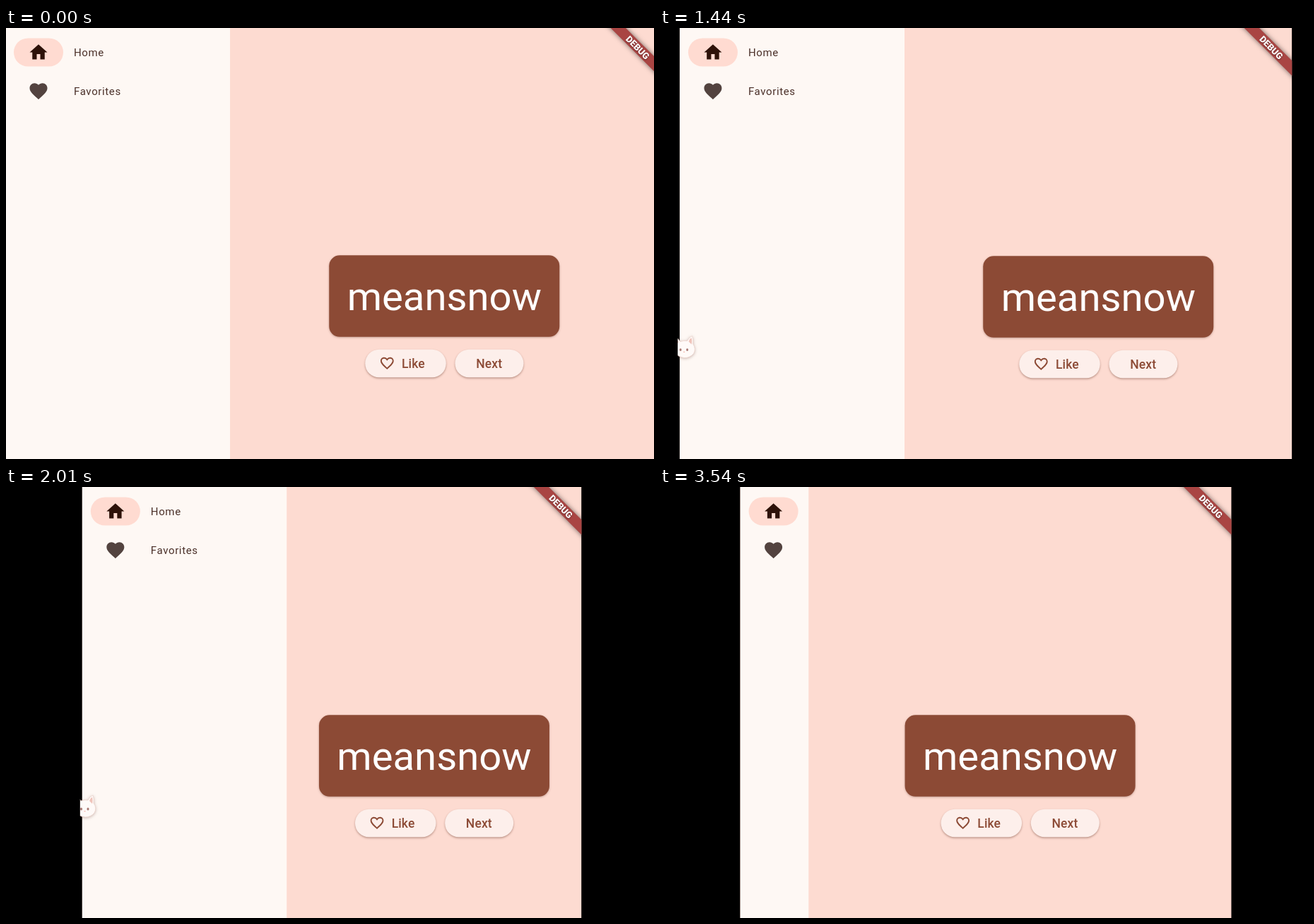
These frames come from a looping animation (917 px wide and 611 px high, 3.61 s). An HTML page with a canvas:

```html
<!DOCTYPE html>
<html lang="en">
<head>
<meta charset="utf-8">
<title>Resizing app window</title>
<style>
html, body { margin: 0; width: 100%; height: 100%; overflow: hidden; background: #000; }
canvas { display: block; }
</style>
</head>
<body>
<canvas id="stage" width="917" height="611"></canvas>
<script>
const LOOP = 3610, W = 917, H = 611, CENTER = 461;
const ctx = document.getElementById('stage').getContext('2d');

const HEART = new Path2D('M12 21.35l-1.45-1.32C5.4 15.36 2 12.28 2 8.5 2 5.42 4.42 3 7.5 3c1.74 0 3.41.81 4.5 2.09C13.09 3.81 14.76 3 16.5 3 19.58 3 22 5.42 22 8.5c0 3.78-3.4 6.86-8.55 11.54z');
const HOME = new Path2D('M10 20v-6h4v6h5v-8h3L12 3 2 12h3v8z');
const CAT = new Path2D('M1 2Q5 3 9 9Q14 7 19 8Q22 2 26 1Q28 6 27 12Q32 19 28 26Q23 32 15 32Q6 31 3 25Q0 19 3 13Q0 7 1 2z');

// [time, value] pairs; each stretch is linear unless eased
const EDGE = [[1200, -1.3], [1590, 45.5], [1760, 62], [2010, 107.5], [2190, 113.3]];
const CAT_X = [[880, -42], [1020, -7], [1200, -7], [1590, 36], [1760, 52], [2010, 97],
  [2190, 100], [2440, 100], [2900, 430], [3010, 430], [3350, 470]];
const CAT_Y = [[1200, 435], [1590, 436], [2440, 436], [2900, 467], [3010, 467], [3350, 620]];

const smooth = p => p * p * (3 - 2 * p);
const clamp = p => Math.min(1, Math.max(0, p));

function track(keys, t, ease = p => p) {
  const i = keys.findIndex(k => k[0] > t);
  if (i < 0) return keys[keys.length - 1][1];
  if (i === 0) return keys[0][1];
  const [t0, a] = keys[i - 1], [t1, b] = keys[i];
  return a + (b - a) * ease((t - t0) / (t1 - t0));
}

function rect(x, y, w, h, color) {
  ctx.fillStyle = color;
  ctx.fillRect(x, y, w, h);
}

function pill(x, y, w, h, r, color) {
  ctx.beginPath();
  ctx.roundRect(x, y, w, h, r);
  ctx.fillStyle = color;
  ctx.fill();
}

function shadow(color, blur, dy) {
  ctx.shadowColor = color;
  ctx.shadowBlur = blur;
  ctx.shadowOffsetY = dy;
}

function text(str, x, y, font, color, spacing = 0) {
  ctx.font = font + ' Roboto, sans-serif';
  ctx.letterSpacing = spacing + 'px';
  ctx.fillStyle = color;
  ctx.fillText(str, x, y);
}

// Runs a drawing step with its own transform, clip and style
function scoped(draw) {
  ctx.save();
  draw();
  ctx.restore();
}

function icon(path, x, y, size, color, outlined) {
  scoped(() => {
    ctx.translate(x, y);
    ctx.scale(size / 24, size / 24);
    ctx.fillStyle = ctx.strokeStyle = color;
    if (!outlined) return ctx.fill(path);
    ctx.clip(path);
    ctx.lineWidth = 4;
    ctx.stroke(path);
  });
}

function drawRail(left, width, open) {
  scoped(() => {
    ctx.beginPath();
    ctx.rect(left, 0, width, H);
    ctx.clip();
    rect(left, 0, width, H, '#fef8f4');
    pill(left + 12.3, 14.5, 70, 40, 20, '#ffdbd1');
    icon(HOME, left + 32.3, 19.5, 30, '#2e1209');
    icon(HEART, left + 32.3, 74.5, 30, '#53433f');
    ctx.globalAlpha = clamp(open * 4);
    text('Home', left + 97.3, 40, '15px', '#4b3029', 0.63);
    text('Favorites', left + 97.3, 95, '15px', '#4b3029', 0.63);
  });
}

function drawContent(cx, dy) {
  scoped(() => {
    ctx.translate(cx, dy);
    scoped(() => {
      shadow('rgba(90,40,25,.35)', 3, 1);
      pill(-163, 322.3, 326, 115.5, 15, '#8c4a35');
    });
    scoped(() => {
      shadow('rgba(90,40,25,.4)', 3, 1.5);
      pill(-112, 455.8, 114.5, 39.5, 19.7, '#fdefeb');
      pill(15.2, 455.8, 97, 39.5, 19.7, '#fdefeb');
    });
    text('meansnow', -137.6, 400, '56.25px', '#fff');
    icon(HEART, -92.2, 464, 22.5, '#8c4a35', true);
    text('Like', -60.3, 482, '500 17.5px', '#8c4a35', 0.12);
    text('Next', 44.9, 482, '500 17.5px', '#8c4a35', 0.12);
  });
}

function drawBanner(right) {
  scoped(() => {
    ctx.translate(right - 29.3, 27.7);
    ctx.rotate(Math.PI / 4);
    scoped(() => {
      shadow('rgba(0,0,0,.55)', 7, 0);
      rect(-70, -7.5, 140, 15, '#a94543');
    });
    ctx.textAlign = 'center';
    shadow('rgba(0,0,0,.4)', 2, 1);
    text('DEBUG', 0, 4.6, '900 12.75px', '#fff');
  });
}

function drawCat(x, y, clipLeft) {
  scoped(() => {
    ctx.beginPath();
    ctx.rect(clipLeft, 0, W, H);
    ctx.clip();
    ctx.translate(x, y);
    scoped(() => {
      shadow('rgba(110,70,60,.4)', 4, 1);
      ctx.fillStyle = '#fffaf8';
      ctx.fill(CAT);
    });
    ctx.strokeStyle = '#ecd3cc';
    ctx.lineWidth = 0.8;
    ctx.stroke(CAT);
    ctx.fillStyle = '#f0c4ba';
    ctx.fill(new Path2D('M3 5Q6 7 7 10L4 12zM21 9Q23 4 25 4Q26 8 25 13z'));
    ctx.fillStyle = '#a87872';
    for (const ex of [9.5, 19]) {
      ctx.beginPath();
      ctx.ellipse(ex, 20.5, 1.5, 1.9, 0, 0, 7);
      ctx.fill();
    }
    ctx.fillStyle = '#f3b8b0';
    ctx.fillRect(13.5, 23, 2, 1.3);
  });
}

function draw(now) {
  const t = now % LOOP;
  const left = track(EDGE, t), right = 2 * CENTER - left;
  const open = 1 - smooth(clamp((t - 1966) / 200));
  const rail = 97.2 + 221.3 * open;

  rect(0, 0, W, H, '#000');
  scoped(() => {
    ctx.beginPath();
    ctx.rect(left, 0, right - left, H);
    ctx.clip();
    rect(left, 0, right - left, H, '#fddbd1');
    drawRail(left, rail, open);
    drawContent((left + rail + right) / 2, clamp((t - 1200) / 150));
    drawBanner(right);
  });

  const ease = t > 2400 ? smooth : undefined;
  drawCat(track(CAT_X, t, ease), track(CAT_Y, t, ease), left - 2.7);
}

const start = performance.now();
function tick() {
  draw(performance.now() - start);
  requestAnimationFrame(tick);
}
tick();
</script>
</body>
</html>
```
